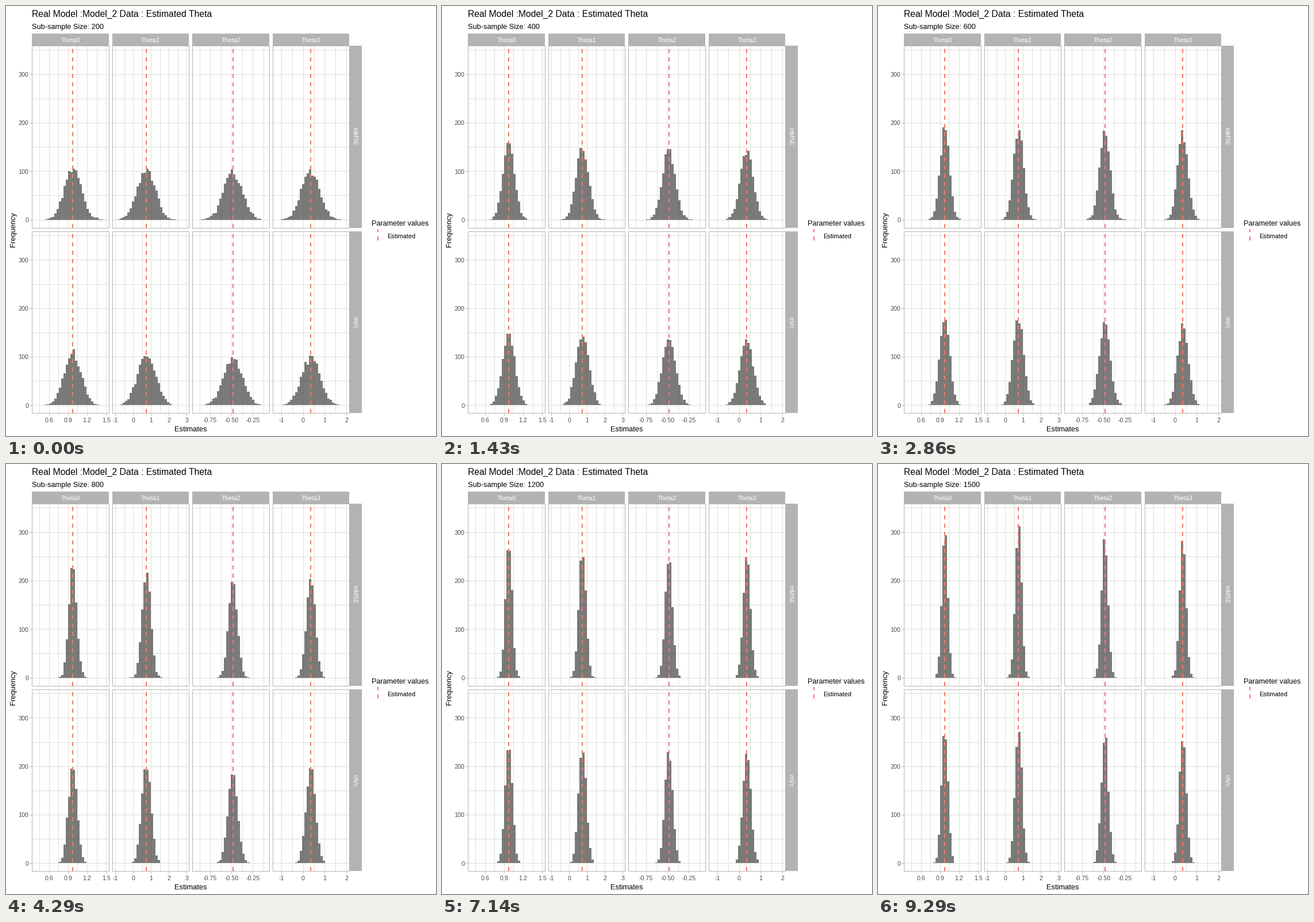
Animation of 748 by 748 pixels, one loop 10 s. Source, as a matplotlib script:

```python
import math
import numpy as np
import matplotlib.pyplot as plt
from matplotlib.animation import FuncAnimation
from matplotlib.patches import Polygon, Rectangle

plt.rcParams["font.family"] = "Liberation Sans"

W = H = 748
DPI = 100
PX = 72 / DPI                      # points per pixel
GREY, GRID, RED, TICK = "#B3B3B3", "#DEDEDE", "#F8766D", "#4D4D4D"
PANEL_W, PANEL_H = 133.4, 316.3
COL_STEP, ROW_STEP = 139.6, 322.8
UNIT = 0.8433                      # pixels per count
BINS, DRAWS = 30, 1000
LOOP, STEP = 10000, 40             # milliseconds
FIRST, LAST, GROW = 200, 1500, 100
STAGES = (LAST - FIRST) // GROW + 1

# axis low, axis high, label step, decimals, estimate, spread at the first size
THETAS = [
    (0.336, 1.541, 0.3, 1, 0.977, 0.136),
    (-1.164, 3.125, 1, 0, 0.745, 0.50),
    (-0.956, -0.057, 0.25, 2, -0.482, 0.111),
    (-1.404, 2.144, 1, 0, 0.351, 0.43),
]
METHODS = ["mMSE", "mVc"]

fig = plt.figure(figsize=(W / DPI, H / DPI), dpi=DPI, facecolor="white")
ax = fig.add_axes([0, 0, 1, 1])
ax.set_xlim(0, W)
ax.set_ylim(H, 0)
ax.axis("off")


def line(x0, y0, x1, y1, color, width=1, z=1, **kw):
    ax.plot([x0, x1], [y0, y1], color=color, lw=width * PX, zorder=z,
            solid_capstyle="butt", dash_capstyle="butt", **kw)


def dashed(x, bottom, top):
    line(x, bottom, x, top, RED, 2, 4, dashes=(3.62, 3.62))


def strip(x, y, w, h):
    ax.add_patch(Rectangle((x, y), w, h, fc=GREY, ec="none", lw=0, zorder=2))


def text(x, y, s, size, color="black", ha="left", dy=0.36):
    return ax.text(x, y + dy * size, s, fontsize=size * PX, color=color,
                   ha=ha, va="baseline", zorder=6)


def turned(x, y, s, size, angle, color):
    ax.text(x, y, s, fontsize=size * PX, color=color, rotation=angle,
            ha="center", va="center", zorder=6)


def left_of(col):
    return 45.3 + COL_STEP * col


def top_of(row):
    return 69.3 + ROW_STEP * row


def count_y(row, count):
    return 371.6 + ROW_STEP * row - UNIT * count


def theta_x(col, value):
    low, high = THETAS[col][:2]
    return left_of(col) + PANEL_W * (value - low) / (high - low)


def multiples(low, high, step):
    return [k * step for k in range(math.ceil(low / step),
                                    math.floor(high / step) + 1)]


class Hist:
    """Normal estimates that tighten as the sub-sample grows."""

    def __init__(self, col, row):
        self.col, self.row = col, row
        low, high = THETAS[col][:2]
        margin = (high - low) / 22
        self.edges = np.linspace(low + margin, high - margin, BINS + 1)
        self.shape = Polygon([[0, 0]], closed=True, fc="#595959", ec="none",
                             lw=0, alpha=0.8, zorder=3)
        ax.add_patch(self.shape)

    def counts(self, size):
        mean, spread = THETAS[self.col][4:]
        sd = spread * (size / FIRST) ** (0.05 * self.row - 0.54)
        z = (self.edges - mean) / (sd * math.sqrt(2))
        n = DRAWS * np.diff([math.erf(v) / 2 for v in z])
        rng = np.random.default_rng(size + 10 * self.col + self.row)
        n += 0.4 * np.sqrt(n) * rng.standard_normal(BINS)
        return np.maximum(np.round(n), 0)

    def draw(self, size):
        base = count_y(self.row, 0)
        y = np.repeat(count_y(self.row, self.counts(size)), 2)
        x = np.repeat(theta_x(self.col, self.edges), 2)
        self.shape.set_xy(np.column_stack([x, np.r_[base, y, base]]))


def draw_panel(col, row):
    low, high, step = THETAS[col][:3]
    left, top = left_of(col), top_of(row)
    right, bottom = left + PANEL_W, top + PANEL_H
    for v in multiples(low, high, step / 2):
        x = theta_x(col, v)
        line(x, top, x, bottom, GRID)
    for v in range(0, 351, 50):
        y = count_y(row, v)
        line(left, y, right, y, GRID)
    dashed(theta_x(col, THETAS[col][4]), bottom, top)
    ax.add_patch(Rectangle((left, top), PANEL_W, PANEL_H, fc="none", ec=GREY,
                           lw=PX, zorder=5))


for c, (low, high, step, places, _, _) in enumerate(THETAS):
    strip(left_of(c), 48, PANEL_W, 21)
    text(left_of(c) + PANEL_W / 2, 59.3, f"Theta{c}", 10.6, "white", "center")
    for r in range(len(METHODS)):
        draw_panel(c, r)
    for v in multiples(low, high, step):
        x = theta_x(c, v)
        line(x, 708.5, x, 712, GREY)
        text(x, 720, f"{v:.{places}f}", 10.6, TICK, "center")

for r, name in enumerate(METHODS):
    strip(597.7, top_of(r), 21.3, PANEL_H)
    turned(606, top_of(r) + PANEL_H / 2, name, 10.6, -90, "white")
    for v in range(0, 301, 100):
        y = count_y(r, v)
        line(41.5, y, 45, y, GREY)
        text(39.5, y + 0.5, str(v), 10.8, TICK, "right")

text(45, 19, "Real Model :Model_2 Data : Estimated Theta", 15.75, dy=0)
subtitle = text(45, 40, "", 12.8, dy=0)
text(321.3, 735.5, "Estimates", 12.9, ha="center")
turned(13, 389, "Frequency", 12.9, 90, "black")
text(636.5, 377.5, "Parameter values", 12.6)
text(663, 400, "Estimated", 11)
dashed(647, 408, 388)

hists = [Hist(c, r) for c in range(len(THETAS)) for r in range(len(METHODS))]


def update(i):
    # the stage reached by the end of this time step
    stage = (STEP * (i + 1) - 1) * STAGES // LOOP
    size = FIRST + GROW * stage
    subtitle.set_text(f"Sub-sample Size: {size}")
    for h in hists:
        h.draw(size)
    return [subtitle] + [h.shape for h in hists]


anim = FuncAnimation(fig, update, frames=LOOP // STEP, interval=STEP,
                     repeat=True, repeat_delay=0)
plt.show()
```
